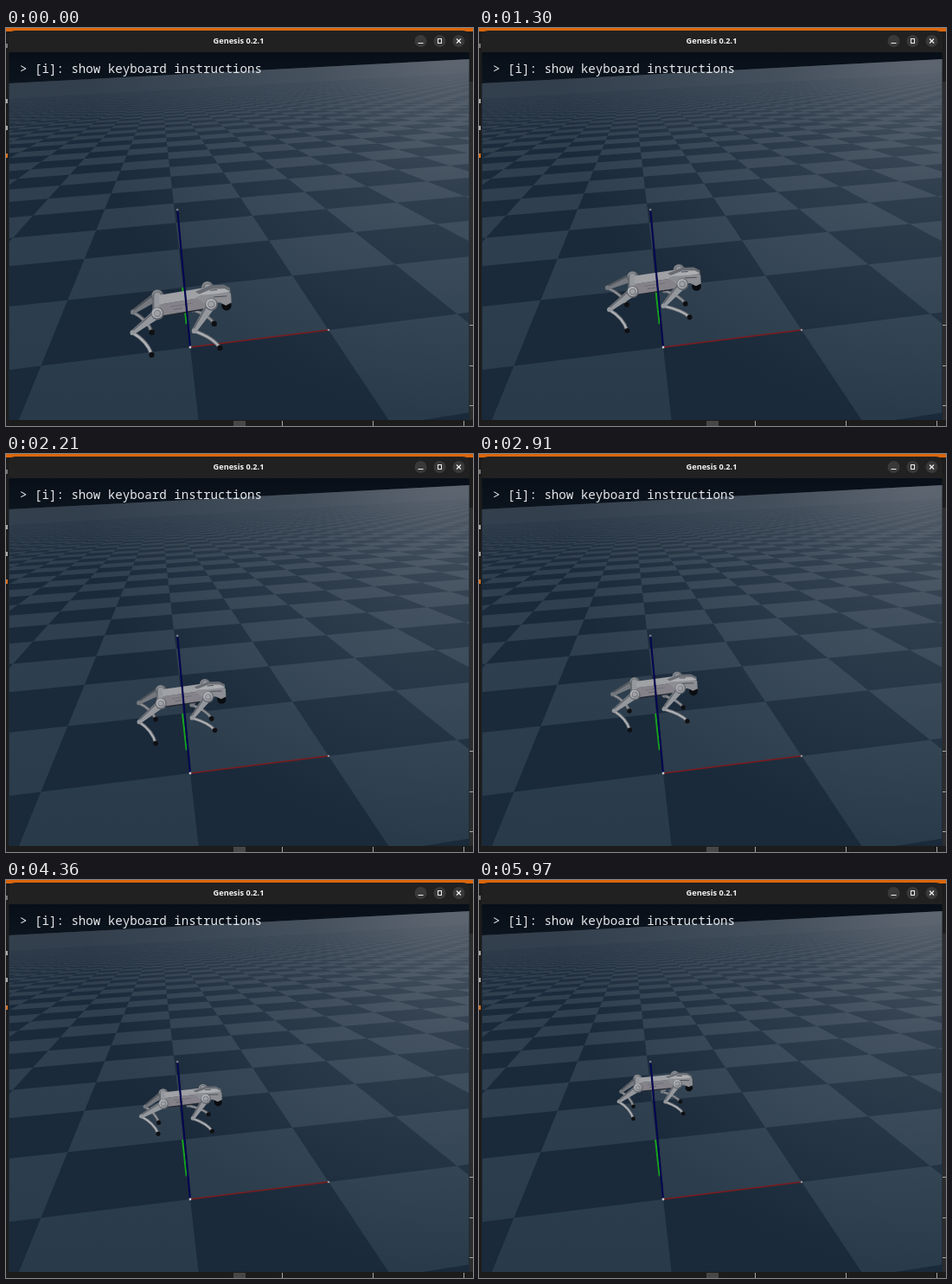
Write an HTML page with a canvas that moves like this. It is 540 by 460 pixels and loops after 6 s.

```html
<!DOCTYPE html>
<html lang="en">
<head>
<meta charset="utf-8">
<title>Genesis 0.2.1</title>
<style>
  html, body { margin: 0; width: 100%; height: 100%; overflow: hidden; background: #1c1c1c; }
  #stage { position: relative; width: 540px; height: 460px; overflow: hidden; }
  canvas { position: absolute; left: 0; top: 0; }
  #title, #hint { position: absolute; white-space: pre; line-height: 20px; }
  #title { left: 169px; width: 200px; top: 5px; text-align: center; color: #f4f4f4;
    font: bold 9.2px/20px "Open Sans", "Noto Sans", sans-serif; }
  #hint { left: 16px; top: 37px; color: #e6e9ec; font: 14.15px/20px "Noto Sans Mono", "DejaVu Sans Mono", monospace; }
</style>
</head>
<body>
<div id="stage">
  <canvas id="view" width="540" height="460"></canvas>
  <div id="title">Genesis 0.2.1</div>
  <div id="hint">&gt; [i]: show keyboard instructions</div>
</div>
<script>
const W = 540, H = 460, LOOP = 6000;
const ctx = document.getElementById('view').getContext('2d');

// Camera: image of the origin plus weighted vanishing points of each axis.
const ORIGIN = [213, 369];
const AXES = [
  { at: [4580, -177], w: 0.03803 },
  { at: [177, 55], w: 0.2816 },
  { at: [358, 1923], w: -0.0928 }
];
const depth = p => 1 + AXES.reduce((s, a, i) => s + a.w * p[i], 0);
const project = p => [0, 1].map(k =>
  (ORIGIN[k] + AXES.reduce((s, a, i) => s + a.w * p[i] * a.at[k], 0)) / depth(p));

function poly(c, pts, fill) {
  c.beginPath();
  pts.forEach(([x, y]) => c.lineTo(x, y));
  c.closePath();
  c.fillStyle = fill;
  c.fill();
}

function line(c, a, b, color, width, cap = 'butt') {
  c.beginPath();
  c.moveTo(...a);
  c.lineTo(...b);
  c.lineCap = cap;
  c.lineWidth = width;
  c.strokeStyle = color;
  c.stroke();
}

function dot(c, [x, y], r, fill) {
  c.beginPath();
  c.arc(x, y, r, 0, 7);
  c.fillStyle = fill;
  c.fill();
}

function gradient(c, box, stops) {
  const g = c.createLinearGradient(...box);
  stops.forEach(([at, color]) => g.addColorStop(at, color));
  return g;
}

function drawFloor(c) {
  c.save();
  c.beginPath();
  c.rect(3.5, 28, 532, 425);
  c.clip();
  c.fillStyle = gradient(c, [0, 28, 0, 66], [[0, '#080f18'], [1, '#0c141e']]);
  c.fillRect(0, 0, W, H);
  c.beginPath();
  [[0, 64.2], [W, 35.8], [W, H], [0, H]].forEach(p => c.lineTo(...p));
  c.clip();
  c.fillStyle = gradient(c, [0, 50, 0, 450], [[0, '#323f4d'], [0.4, '#2f3f4f'], [1, '#293b4a']]);
  c.fillRect(0, 0, W, H);
  for (let y = -2; y < 62; y++) {
    c.globalAlpha = y < 8 ? 1 : Math.max(0.5, 1 - (y - 8) / 80);
    for (let x = -24; x < 48; x++) {
      if ((x + y) % 2 === 0) continue;
      const quad = [[x, y, 0], [x + 1, y, 0], [x + 1, y + 1, 0], [x, y + 1, 0]];
      if (quad.some(p => depth(p) < 0.1)) continue;
      poly(c, quad.map(project), '#1a2a3a');
    }
  }
  c.globalAlpha = 1;
  // haze near the horizon, then the light falling in from the upper right
  c.fillStyle = gradient(c, [268, 50, 272.5, 136], [[0, 'rgba(52,63,76,.6)'], [0.25, 'rgba(52,63,76,.25)'], [1, 'rgba(52,63,76,0)']]);
  c.fillRect(0, 0, W, H);
  const glow = c.createRadialGradient(520, 20, 0, 520, 20, 430);
  glow.addColorStop(0, 'rgba(190,190,195,.32)');
  glow.addColorStop(0.4, 'rgba(180,185,192,.14)');
  glow.addColorStop(1, 'rgba(170,180,190,0)');
  c.fillStyle = glow;
  c.fillRect(0, 0, W, H);
  c.restore();
}

function drawDesktop(c) {
  c.fillStyle = '#1c1c1c';
  c.fillRect(0, 0, W, H);
  c.fillStyle = '#2b2c2d';
  c.fillRect(536, 62, 4, 391);
  c.fillStyle = '#dc660c';
  c.fillRect(0, 0, W, 4);
  c.fillStyle = '#474747';
  c.fillRect(263, 454, 14, 6);
  c.fillStyle = '#a8a8a8';
  [319, 424, 529].forEach(x => c.fillRect(x, 454, 1, 6));
  [343, 390, 436].forEach(y => c.fillRect(536, y, 4, 1));
  [[20, '#777'], [84, '#aaa'], [115, '#aaa'], [147, '#d9711f']].forEach(([y, color]) => {
    c.fillStyle = color;
    c.fillRect(0, y - 2, 2, 5);
  });
}

function drawTitleBar(c) {
  c.beginPath();
  c.moveTo(3, 28);
  c.lineTo(3, 11);
  c.quadraticCurveTo(3, 3, 11, 3);
  c.lineTo(528, 3);
  c.quadraticCurveTo(536, 3, 536, 11);
  c.lineTo(536, 28);
  c.fillStyle = '#212121';
  c.fill();
  [479, 501, 523].forEach(x => dot(c, [x + 0.5, 15], 7, '#393939'));
  line(c, [476.5, 17.5], [482.5, 17.5], '#eee', 1);
  c.strokeRect(499.5, 12.5, 4, 5);
  line(c, [521, 12.5], [526, 17.5], '#eee', 1.2);
  line(c, [526, 12.5], [521, 17.5], '#eee', 1.2);
}

function makeBackdrop() {
  const layer = document.createElement('canvas');
  layer.width = W;
  layer.height = H;
  const c = layer.getContext('2d');
  drawDesktop(c);
  drawFloor(c);
  drawTitleBar(c);
  const o = project([0, 0, 0]), x = project([1, 0, 0]);
  line(c, project([-0.008, 0.33, 0]), project([-0.008, 1, 0]), '#16a41c', 2);
  line(c, o, x, '#7c1a1e', 1.3);
  dot(c, x, 1.3, '#9a9298');
  return layer;
}

function drawUpAxis() {
  const o = project([0, 0, 0]), tip = project([0, 0, 1]);
  line(ctx, o, tip, '#0a0c3a', 2.2);
  line(ctx, o, tip, '#06065c', 1.3);
  dot(ctx, tip, 1.4, '#777e8a');
  dot(ctx, o, 1.4, '#c8c8cc');
}

// Robot, in metres; x forward, y to its left, z up from the ground.
const HIP_Z = 0.33, LINK = 0.213, STRIDE = 0.028, LIFT = 0.06;
const REAR = -0.165, FRONT = 0.193;
const GAIT_HZ = 2.43, GAIT_START = 0.05;

function robotPose(t) {
  const size = 1 + 0.012 * t, pitch = 0.06 - 0.009 * t;
  const cx = -0.028 + 0.0135 * t, cy = 0.07 + 0.265 * t;
  const bob = 0.004 * Math.cos(4 * Math.PI * (GAIT_HZ * t + GAIT_START));
  const place = ([x, y, z]) => [cx + size * x, cy + size * y, z];
  const body = ([x, y, z]) => [x, y, HIP_Z + bob + z + pitch * x];
  return {
    phase: GAIT_HZ * t + GAIT_START,
    unit: 160 * size / depth([cx, cy, 0.2]),
    body,
    shot: p => project(place(p)),
    fixed: p => project(place(body(p)))
  };
}

function drawLeg(pose, end, side) {
  const near = side < 0;
  const turn = 2 * Math.PI * (pose.phase + (end * side < 0 ? 0 : 0.5));
  const hip = pose.body([end > 0 ? FRONT : REAR, side * 0.135, 0]);
  const foot = [end > 0 ? 0.225 : -0.235, side * 0.16 - STRIDE * Math.cos(turn),
    0.018 + LIFT * Math.max(0, Math.sin(turn))];
  const dx = foot[0] - hip[0], dz = foot[2] - hip[2], len = Math.hypot(dx, dz);
  const bend = Math.sqrt(Math.max(0, LINK * LINK - len * len / 4));
  const knee = [hip[0] + dx / 2 + bend * dz / len, (hip[1] + foot[1]) / 2, hip[2] + dz / 2 - bend * dx / len];
  const [h, k, f] = [hip, knee, foot].map(pose.shot);
  const u = pose.unit;
  const tone = near ? ['#65696f', '#94979c', '#adafb3'] : ['#50555b', '#74787e', '#8b8f94'];

  const shin = (color, width, shift) => {
    ctx.beginPath();
    ctx.moveTo(k[0] + shift, k[1]);
    ctx.quadraticCurveTo(k[0] + (f[0] - k[0]) * 0.62 + 0.025 * u + shift, k[1] + (f[1] - k[1]) * 0.4, f[0], f[1]);
    ctx.lineCap = 'round';
    ctx.lineWidth = width * u;
    ctx.strokeStyle = color;
    ctx.stroke();
  };
  shin(tone[0], 0.027, 0);
  shin(tone[2], 0.016, -0.4);
  dot(ctx, f, 0.02 * u, '#0f1013');

  const nx = -(k[1] - h[1]) / (LINK * u), ny = (k[0] - h[0]) / (LINK * u);
  const off = (p, w) => [p[0] + nx * w * u, p[1] + ny * w * u];
  poly(ctx, [off(h, 0.033), off(k, 0.016), off(k, -0.016), off(h, -0.033)], tone[1]);
  line(ctx, off(h, 0.024), off(k, 0.011), tone[0], 0.013 * u);
  dot(ctx, k, 0.018 * u, tone[1]);
  dot(ctx, h, 0.046 * u, tone[0]);
  dot(ctx, [h[0] - 0.4, h[1] - 0.6], 0.038 * u, tone[2]);
  if (near) {
    dot(ctx, h, 0.026 * u, '#7b7e84');
    dot(ctx, [h[0] - 0.3, h[1] - 0.3], 0.018 * u, '#a0a2a6');
  }
}

function drawTrunk(pose) {
  const at = pts => pts.map(pose.fixed);
  const u = pose.unit;
  // hip motors at both ends
  [REAR, FRONT].forEach(x => {
    line(ctx, pose.fixed([x, 0.12, 0]), pose.fixed([x, -0.12, 0]), '#666a70', 0.075 * u, 'round');
    line(ctx, pose.fixed([x, 0.11, 0.015]), pose.fixed([x, -0.11, 0.015]), '#95989d', 0.045 * u, 'round');
  });
  poly(ctx, at([[-0.15, -0.07, -0.065], [0.16, -0.07, -0.065], [0.16, 0, -0.06], [-0.15, 0, -0.06]]), '#222730');
  poly(ctx, at([[-0.155, -0.07, -0.055], [0.17, -0.07, -0.055], [0.18, -0.07, 0.03], [-0.15, -0.07, 0.03]]), '#858289');
  poly(ctx, at([[-0.15, -0.07, 0.03], [0.18, -0.07, 0.03], [0.17, 0.06, 0.038], [-0.15, 0.06, 0.038]]), '#9fa1a5');
  line(ctx, pose.fixed([-0.08, -0.07, 0]), pose.fixed([0.07, -0.07, 0]), '#6d6b74', 0.8);
  line(ctx, pose.fixed([-0.06, -0.07, -0.025]), pose.fixed([0, -0.07, -0.025]), '#68666f', 1.2);
}

function drawHead(pose) {
  const side = (pts, y) => pts.map(([x, z]) => pose.fixed([x, y, z - 0.036]));
  const u = pose.unit;
  poly(ctx, side([[0.1, 0.06], [0.21, 0.088], [0.3, 0.078], [0.345, 0.045], [0.345, -0.035], [0.3, -0.06], [0.2, -0.035]], 0.05), '#696d73');
  dot(ctx, pose.fixed([0.307, 0, -0.098]), 0.036 * u, '#0a0c10');
  poly(ctx, side([[0.1, 0.055], [0.21, 0.083], [0.3, 0.07], [0.34, 0.04], [0.34, -0.03], [0.3, -0.045], [0.26, -0.015], [0.16, -0.01]], -0.03), '#8c8e93');
  poly(ctx, side([[0.1, 0.058], [0.21, 0.088], [0.3, 0.075], [0.34, 0.045], [0.25, 0.045]], -0.01), '#acaeb2');
  line(ctx, ...side([[0.22, 0.035], [0.31, 0.025]], -0.03), '#4d5158', 1);
  line(ctx, ...side([[0.2, 0.075], [0.25, 0.07]], 0), '#4a4e56', 1);
}

function drawRobot(t) {
  const pose = robotPose(t);
  drawLeg(pose, -1, 1);
  drawLeg(pose, 1, 1);
  drawTrunk(pose);
  drawHead(pose);
  drawLeg(pose, -1, -1);
  drawLeg(pose, 1, -1);
}

const backdrop = makeBackdrop();
const start = performance.now();

function frame() {
  const t = ((performance.now() - start) % LOOP) / 1000;
  ctx.drawImage(backdrop, 0, 0);
  drawRobot(t);
  drawUpAxis();
  requestAnimationFrame(frame);
}
frame();
</script>
</body>
</html>
```
